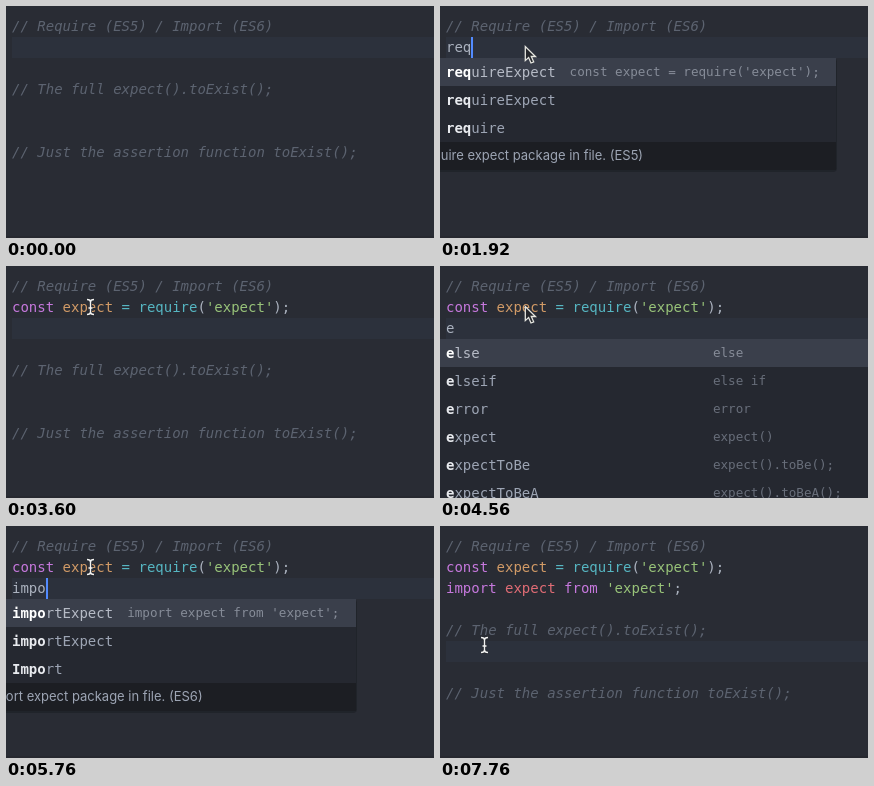
An HTML page for the animation above (8000 ms loop, 428x232 px).

```html
<!DOCTYPE html>
<html lang="en">
<head>
<meta charset="utf-8">
<style>
html, body { margin: 0; width: 100%; height: 100%; overflow: hidden; background: #292c34; }
svg { display: block; width: 428px; height: 232px; }
text { font: 14px "DejaVu Sans Mono", monospace; white-space: pre; fill: #abb2bf; }
.comment { font-style: italic; fill: #5c6370; }
.key { fill: #c678dd; }
.name { fill: #d19a66; }
.op { fill: #56b6c2; }
.str { fill: #98c379; }
.var { fill: #e06c75; }
.item { fill: #9da5b4; }
.item.on { fill: #b6bbc6; }
.hit { font-weight: bold; fill: #e8eaee; }
.on .hit { fill: #fff; }
.hint { font-size: 12.6px; fill: #686e7a; }
.hint.on { fill: #868c98; }
.desc { font: 13px Inter, sans-serif; fill: #9da5b4; }
</style>
</head>
<body>
<svg id="stage" viewBox="0 0 428 232"></svg>
<script>
const LOOP = 8000, LEFT = 6, CHAR = 8.43, LINE = 21, TOP = 10, ROW = 28;
const stage = document.getElementById('stage');

const span = (cls, s) => `<tspan class="${cls}">${s}</tspan>`;
const text = (x, y, s, cls = '') => `<text x="${x}" y="${y}" class="${cls}">${s}</text>`;
const rect = (x, y, w, h, fill) => `<rect x="${x}" y="${y}" width="${w}" height="${h}" fill="${fill}"/>`;
const lineTop = n => TOP + n * LINE;

// Latest entry [time, ...values] that has started
const at = (steps, t) => steps.reduce((cur, s) => s[0] <= t ? s : cur);

const requireLine = span('key', 'const') + span('name', ' expect') + span('op', ' = require') +
  '(' + span('str', "'expect'") + ');';
const importLine = span('key', 'import') + span('var', ' expect') + span('key', ' from') +
  span('str', " 'expect'") + ';';

const requireHint = "const expect = require('expect');";
const importHint = "import expect from 'expect';";

const menus = {
  re: { w: 396, col: 13, rows: [['return', 'return'], ['requireExpect', requireHint], ['requireExpect'], ['require']] },
  req: { w: 396, col: 13, rows: [['requireExpect', requireHint], ['requireExpect'], ['require']],
    desc: 'Require expect package in file. (ES5)' },
  e: { w: 440, col: 30, rows: [['else', 'else'], ['elseif', 'else if'], ['error', 'error'], ['expect', 'expect()'],
    ['expectToBe', 'expect().toBe();'], ['expectToBeA', 'expect().toBeA();']] },
  i: { w: 440, col: 12, rows: [['idea', 'idea'], ['if', 'if'], ['ife', 'if … else'],
    ['iife', 'Immediately-Invoked Function Expression'], ['inspect', 'inspect'], ['importExpect', importHint]] },
  imp: { w: 350, col: 12, rows: [['importExpect', importHint], ['importExpect'], ['Import']],
    desc: 'Import expect package in file. (ES6)' }
};

// time, first typed line, second typed line, menu
const typing = [
  [0, '', '', ''], [1600, 'r', '', ''], [1680, 're', '', 're'], [1920, 'req', '', 'req'],
  [2560, requireLine, '', ''], [4320, requireLine, 'e', 'e'], [4960, requireLine, '', ''],
  [5200, requireLine, 'i', ''], [5280, requireLine, 'i', 'i'], [5440, requireLine, 'im', ''],
  [5600, requireLine, 'imp', 'imp'], [5760, requireLine, 'impo', 'imp'], [6000, requireLine, importLine, '']
];

// time, caret visible
const blink = [
  [0, 0], [880, 1], [1280, 0], [1600, 1], [2160, 0], [2560, 1], [2880, 0], [3280, 1], [3600, 0], [4000, 1],
  [4560, 0], [4960, 1], [6320, 0], [6720, 1], [7120, 0], [7440, 1], [7760, 0]
];

// time, pointer x, y
const moves = [
  [0, -50, -50], [160, 285, 188], [240, 160, 98], [320, 76, 41], [400, 98, 57], [560, 72, 31], [640, 94, 48],
  [880, 84.5, 40], [6560, 80, 48], [6640, 68, 62], [6720, 54, 78], [6800, 40, 93], [6880, 29, 106],
  [6960, 21, 114], [7040, 20, 117], [7120, 27, 118], [7200, 37, 119], [7280, 44.5, 119]
];
const shapes = [[0, 'arrow'], [2560, 'beam'], [4320, 'arrow'], [4960, 'beam'], [5200, 'arrow'], [5440, 'beam']];

const pointers = {
  arrow: '<path d="M.8 .5V14.6L4.1 11.5 6.5 17 9.2 15.8 6.8 10.5H11Z" fill="#25272c" stroke="#e6e6e0" stroke-width="1.3"/>',
  beam: ['#22252b" stroke-width="3', '#f2f2f2" stroke-width="1.4'].map(stroke =>
    `<path d="M-3.5 -7.5Q0 -7.5 0 -5V5Q0 7.5 -3.5 7.5M3.5 -7.5Q0 -7.5 0 -5M0 5Q0 7.5 3.5 7.5M-2 1H2" fill="none" stroke="${stroke}"/>`).join('')
};

function drawMenu({ w, col, rows, desc }, typed, top) {
  const h = (rows.length + (desc ? 1 : 0)) * ROW;
  const hintX = LEFT + col * CHAR + 14;
  let out = `<rect x="-30" y="${top}" width="${w + 31}" height="${h + 2}" rx="4" fill="#1c1e24" opacity=".6"/>` +
    `<rect x="-30" y="${top}" width="${w + 30}" height="${h}" rx="3" fill="#252830"/>` +
    rect(-30, top, w + 30, ROW, '#3a3f4b');
  rows.forEach(([name, hint = ''], i) => {
    const y = top + i * ROW, on = i ? '' : ' on', n = typed.length;
    out += text(LEFT, y + 19, span('hit', name.slice(0, n)) + name.slice(n), 'item' + on) +
      text(hintX, y + 18, hint, 'hint' + on);
  });
  if (desc) {
    const y = top + rows.length * ROW;
    out += rect(-30, y, w + 30, ROW, '#1c1e23') + text(-23, y + 18, desc, 'desc');
  }
  return out;
}

function draw(t) {
  const [, first, second, menu] = at(typing, t);
  const shift = t >= 3280 ? 1 : 0;
  const row = t >= 7440 ? 5 : 1 + shift;
  const typed = row === 5 ? '' : shift ? second : first;
  const caretX = LEFT + typed.replace(/<[^>]*>/g, '').length * CHAR;
  const lines = [
    [0, '// Require (ES5) / Import (ES6)', 'comment'], [1, first], [2, second],
    [3 + shift, '// The full expect().toExist();', 'comment'],
    [6 + shift, '// Just the assertion function toExist();', 'comment']
  ];
  const [, x, y] = at(moves, t);

  let out = rect(0, 0, 428, 232, '#292c34') + rect(LEFT, lineTop(row), 422, LINE, '#2c313c') +
    rect(0, 230, 428, 2, '#26282f');
  out += lines.map(([n, s, cls]) => text(LEFT, lineTop(n) + 15, s, cls)).join('');
  if (at(blink, t)[1]) out += rect(Math.round(caretX), lineTop(row), 2, LINE, '#528bff');
  if (menu) out += drawMenu(menus[menu], typed, lineTop(row + 1));
  const shape = at(shapes, t)[1];
  const lift = shape === 'beam' && t < 6560 ? 1 : 0;
  return out + `<g transform="translate(${x} ${y + lift})">${pointers[shape]}</g>`;
}

let shown = '';
function tick() {
  const next = draw(performance.now() % LOOP);
  if (next !== shown) stage.innerHTML = shown = next;
  requestAnimationFrame(tick);
}
tick();
</script>
</body>
</html>
```
